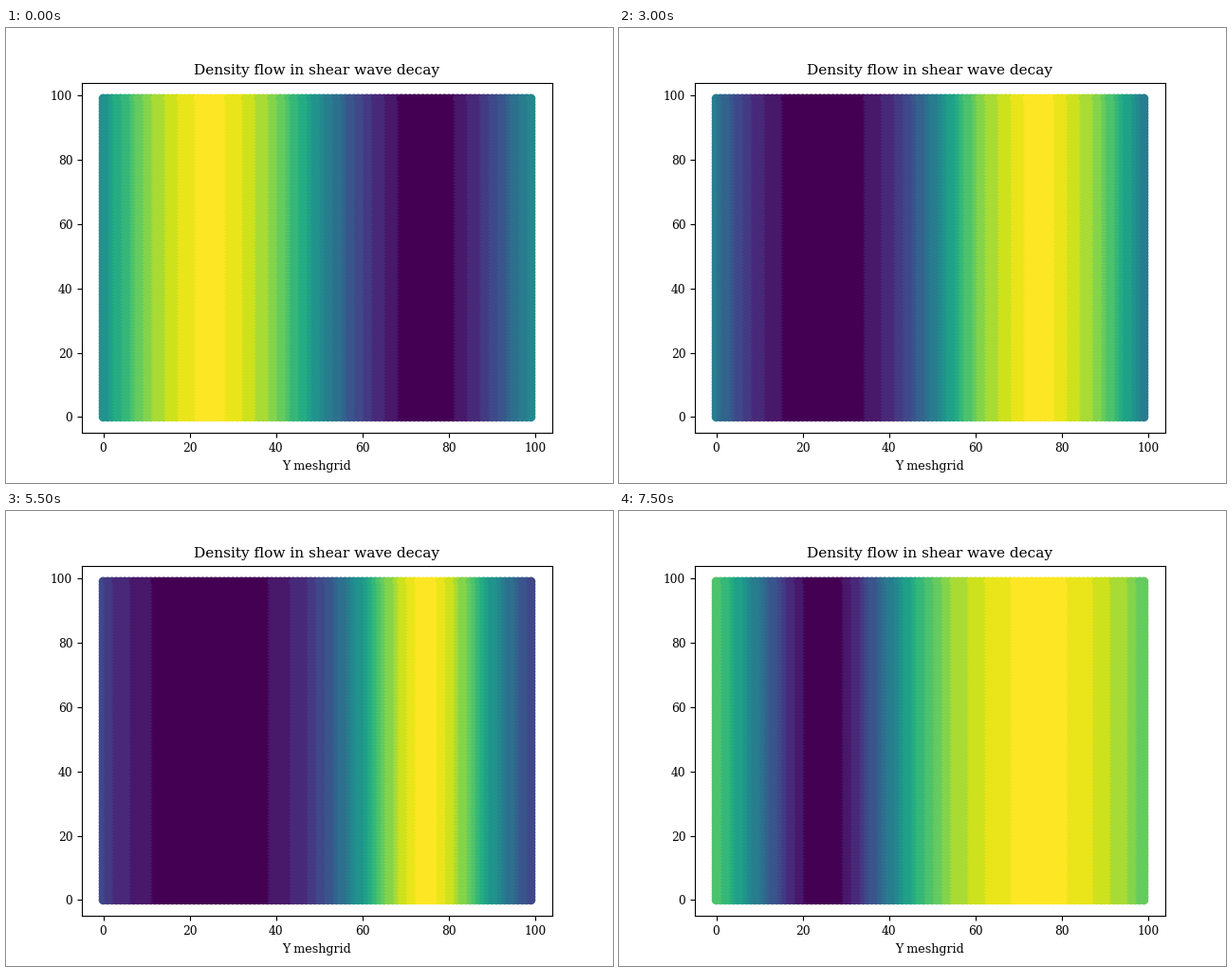
Recreate the animation shown at these times as a matplotlib script. Size 640x480 px, loop 8 s.

```python
import numpy as np
import matplotlib.pyplot as plt
from matplotlib.animation import FuncAnimation

N = 100
FRAMES = 16
STEPS_PER_FRAME = 100
INTERVAL = 500

plt.rcParams["font.family"] = "DejaVu Serif"


def equilibrium(rho, u):
    """Lattice Boltzmann equilibrium, reduced to the x axis."""
    rest = 2 / 3 * rho * (1 - 1.5 * u**2)
    right = rho / 6 * (1 + 3 * u + 3 * u**2)
    left = rho / 6 * (1 - 3 * u + 3 * u**2)
    return rest, right, left


def simulate():
    """Density profiles of the decaying wave (relaxation rate omega = 1)."""
    rho = 1 + 0.08 * np.sin(2 * np.pi * np.arange(N) / N)
    u = np.zeros(N)
    profiles = []
    for step in range(FRAMES * STEPS_PER_FRAME):
        if step % STEPS_PER_FRAME == 0:
            profiles.append(rho)
        rest, right, left = equilibrium(rho, u)
        right, left = np.roll(right, 1), np.roll(left, -1)
        rho = rest + right + left
        u = (right - left) / rho
    return profiles


# Colour bands, finer towards the yellow end
edges = np.concatenate(([0.04, 0.09], np.arange(0.14, 0.86, 0.05), [0.90, 0.95, 0.985]))
levels = np.concatenate(([0], (edges[:-1] + edges[1:]) / 2, [1]))


def shade(rho):
    level = (rho - rho.min()) / np.ptp(rho)
    return np.tile(levels[np.digitize(level, edges)], N)


profiles = simulate()

fig, ax = plt.subplots(figsize=(6.4, 4.8), dpi=100)
x, y = np.meshgrid(np.arange(N), np.arange(N))
dots = ax.scatter(x.ravel(), y.ravel(), c=shade(profiles[0]), cmap="viridis", vmin=0, vmax=1)
ax.set_xlim(-4.95, 103.95)
ax.set_ylim(-4.95, 103.95)
ax.set_title("Density flow in shear wave decay", fontsize=11.06)
ax.set_xlabel("Y meshgrid", fontsize=9.1)
ax.tick_params(labelsize=8.8)
ax.tick_params(axis="x", pad=3.9)


def update(i):
    dots.set_array(shade(profiles[i]))
    return (dots,)


anim = FuncAnimation(fig, update, frames=FRAMES, interval=INTERVAL, repeat=True, repeat_delay=0)
plt.show()
```
